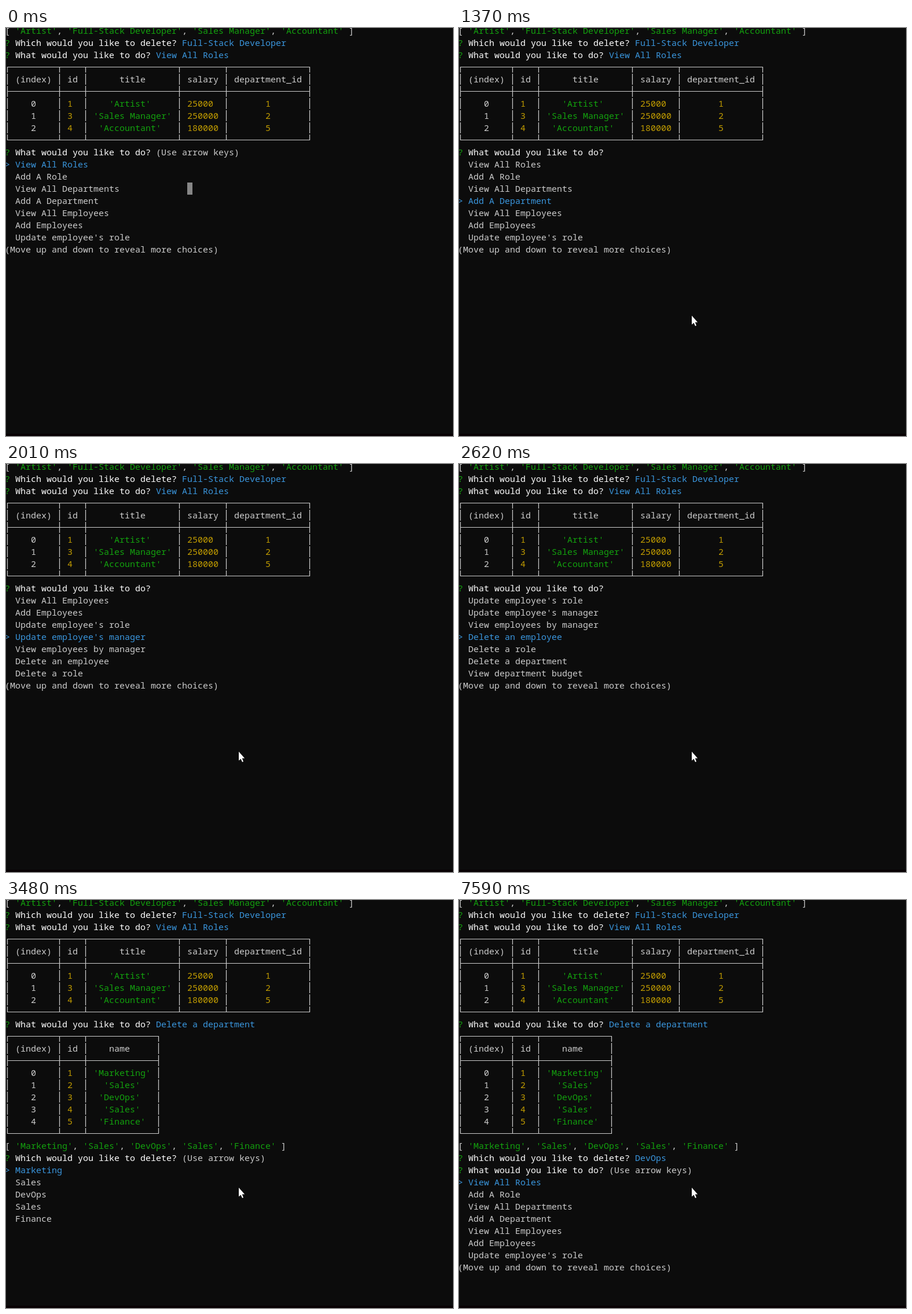
Write an HTML page with a canvas that moves like this. It is 772x705 px and loops after 8 s.

```html
<!DOCTYPE html>
<html lang="en">
<meta charset="utf-8">
<title>Employee tracker terminal</title>
<style>
  html, body { margin: 0; width: 100%; height: 100%; overflow: hidden; background: #0c0c0c; }
  canvas { display: block; }
</style>
<canvas id="screen" width="772" height="705"></canvas>
<script>
const ctx = document.getElementById('screen').getContext('2d', { alpha: false });
const LOOP = 8000, CELL_W = 9, CELL_H = 21;
const GREY = '#cccccc', WHITE = '#ffffff', GREEN = '#13a10e', GOLD = '#c19c00', BLUE = '#3a96dd';
const SOFT_EDGE = '#44444466';

const ACTIONS = ['View All Roles', 'Add A Role', 'View All Departments', 'Add A Department',
  'View All Employees', 'Add Employees', "Update employee's role", "Update employee's manager",
  'View employees by manager', 'Delete an employee', 'Delete a role', 'Delete a department',
  'View department budget'];
const ROLES = ['Artist', 'Full-Stack Developer', 'Sales Manager', 'Accountant'];
const DEPARTMENTS = ['Marketing', 'Sales', 'DevOps', 'Sales', 'Finance'];
const quote = s => `'${s}'`;

const ROLE_TABLE = [
  ['(index)', 'id', 'title', 'salary', 'department_id'],
  ['0', 1, quote('Artist'), 25000, 1],
  ['1', 3, quote('Sales Manager'), 250000, 2],
  ['2', 4, quote('Accountant'), 180000, 5]
];
const DEPARTMENT_TABLE = [
  ['(index)', 'id', 'name'],
  ...DEPARTMENTS.map((name, i) => [String(i), i + 1, quote(name)])
];

// Key presses: each one moves the selection down by one.
const ACTION_KEYS = [990, 1220, 1370, 1540, 1690, 1860, 2010, 2240, 2620, 2930, 3250];
const DEPARTMENT_KEYS = [4870, 5270];
const ACTION_CHOSEN = 3480, DEPARTMENT_CHOSEN = 7590;
// Pointer: time, x, y
const POINTER = [[70, 467, 557], [150, 430, 524], [230, 402, 497], [300, 390, 485], [380, 402, 497]];
const ARROW = new Path2D('M0 0V15.5L3.5 12.4L6 18L8 17.2L5.8 11.4H10.2Z');

const rowTop = row => row * CELL_H - 6;
const presses = (keys, t) => keys.filter(k => t >= k).length;

function rect(x, y, w, h, color) {
  ctx.fillStyle = color;
  ctx.fillRect(x, y, w, h);
}

function put(col, row, text, color = GREY) {
  ctx.fillStyle = color;
  ctx.fillText(text, col * CELL_W - 2, rowTop(row) + 16);
  return col + text.length;
}

function list(row, names) {
  let col = put(0, row, '[ ');
  names.forEach((name, i) => {
    if (i) col = put(col, row, ', ');
    col = put(col, row, quote(name), GREEN);
  });
  put(col, row, ' ]');
}

function ask(row, question, answer, color = BLUE) {
  put(0, row, '?', GREEN);
  put(2, row, question, WHITE);
  put(question.length + 3, row, answer, color);
}

function table(row, data) {
  const widths = data[0].map((_, c) => 2 + Math.max(...data.map(r => String(r[c]).length)));
  const edges = [0];
  widths.forEach(w => edges.push(edges.at(-1) + w + 1));
  const last = row + data.length + 2;

  data.forEach((cells, i) => cells.forEach((value, c) => {
    const text = String(value);
    const color = typeof value === 'number' ? GOLD : text[0] === "'" ? GREEN : GREY;
    put(edges[c] + 1 + Math.floor((widths[c] - text.length) / 2), row + 1 + i + (i > 0), text, color);
  }));

  for (let r = row; r <= last; r++) {
    const from = r === row ? 10 : 1, to = r === last ? 11 : 20;
    for (const e of edges) {
      const x = e * CELL_W + 2, y = rowTop(r) + from;
      rect(x - 1, y, 3, to - from, SOFT_EDGE);
      rect(x, y, 1, to - from, GREY);
    }
  }
  for (const r of [row, row + 2, last])
    rect(2, rowTop(r) + 10, edges.at(-1) * CELL_W + 1, 1, GREY);
}

function menu(row, items, selected) {
  items.forEach((item, i) => {
    const active = i === selected;
    if (active) put(0, row + i, '>', BLUE);
    put(2, row + i, item, active ? BLUE : GREY);
  });
}

// Seven visible choices; the selection stays on the fourth line once it gets there.
function actionMenu(row, selected) {
  ask(row, 'What would you like to do?', selected ? '' : '(Use arrow keys)', GREY);
  const first = Math.max(0, selected - 3);
  const visible = Array.from({ length: 7 }, (_, i) => ACTIONS[(first + i) % ACTIONS.length]);
  menu(row + 1, visible, selected - first);
  put(0, row + 8, '(Move up and down to reveal more choices)');
}

function pointer(t) {
  const step = POINTER.findLast(p => t >= p[0]);
  if (!step) return;
  ctx.save();
  ctx.translate(step[1], step[2]);
  ctx.strokeStyle = '#000';
  ctx.stroke(ARROW);
  ctx.fillStyle = WHITE;
  ctx.fill(ARROW);
  ctx.restore();
}

function draw(t) {
  rect(0, 0, 772, 705, '#0c0c0c');
  rect(0, 701, 772, 4, '#080204');
  ctx.font = '500 15px "Noto Sans Mono", "DejaVu Sans Mono", monospace';

  list(0, ROLES);
  ask(1, 'Which would you like to delete?', 'Full-Stack Developer');
  ask(2, 'What would you like to do?', 'View All Roles');
  table(3, ROLE_TABLE);

  if (t < ACTION_CHOSEN) {
    actionMenu(10, presses(ACTION_KEYS, t));
    if (t < ACTION_KEYS[0]) rect(313, rowTop(13), CELL_W, CELL_H, '#868686');
  } else {
    ask(10, 'What would you like to do?', 'Delete a department');
    table(11, DEPARTMENT_TABLE);
    list(20, DEPARTMENTS);
    const question = 'Which would you like to delete?';
    const selected = presses(DEPARTMENT_KEYS, t);
    if (t < DEPARTMENT_CHOSEN) {
      ask(21, question, selected ? '' : '(Use arrow keys)', GREY);
      menu(22, DEPARTMENTS, selected);
    } else {
      ask(21, question, DEPARTMENTS[selected]);
      actionMenu(22, 0);
    }
  }
  pointer(t);
}

const start = performance.now();
function frame() {
  draw((performance.now() - start) % LOOP);
  requestAnimationFrame(frame);
}
frame();
</script>
</html>
```
